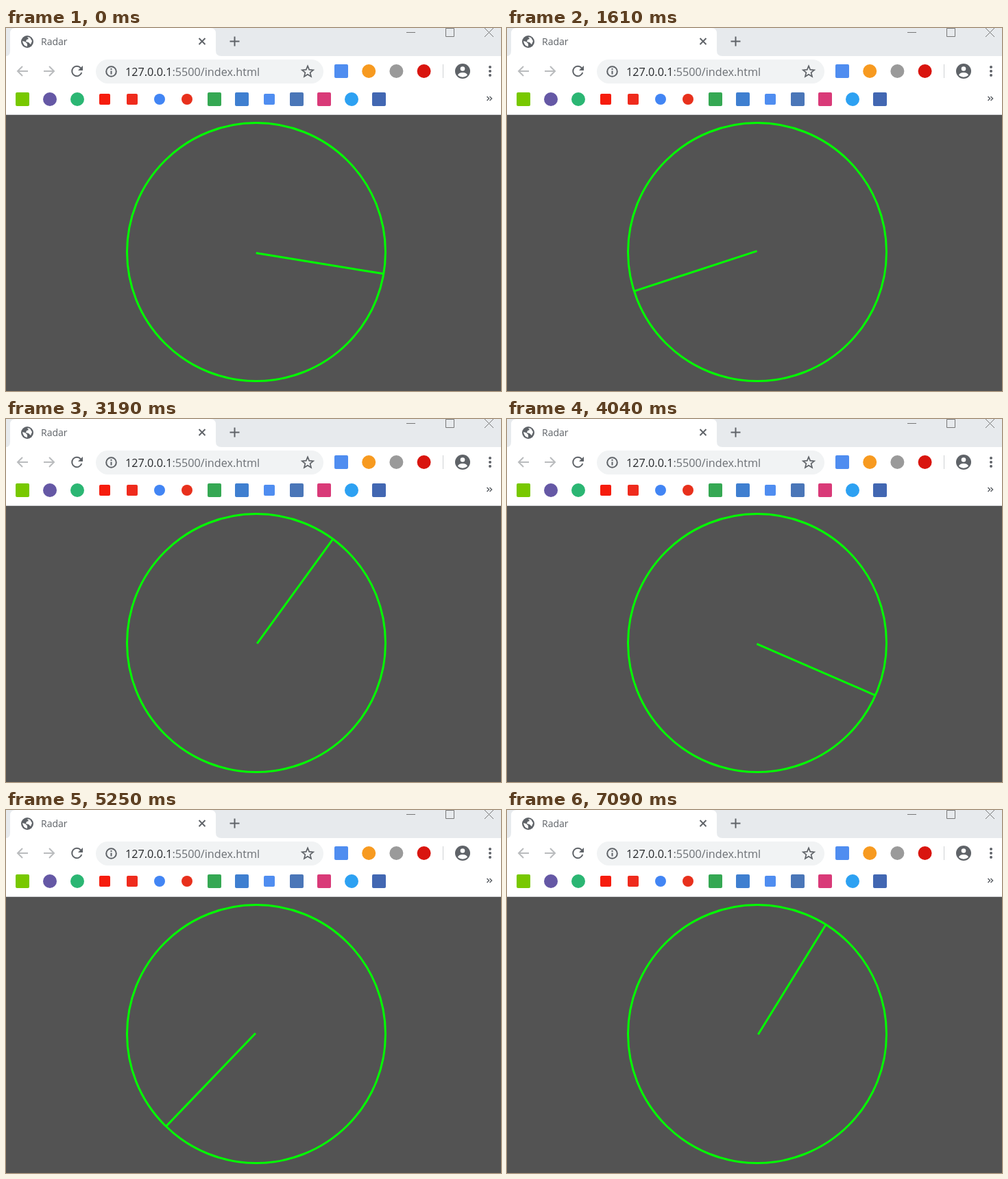
Animation of 722x530 px, one loop 7120 ms. Source, as an HTML page:

```html
<!DOCTYPE html>
<html lang="en">
<head>
<meta charset="utf-8">
<title>Radar</title>
<style>
  html, body { margin: 0; width: 100%; height: 100%; overflow: hidden; background: #535353; }
  svg { display: block; }
  text { font-family: "Open Sans", "Noto Sans", sans-serif; }
  .line { fill: none; stroke: #5f6368; stroke-width: 2; }
</style>
</head>
<body>
<svg width="722" height="530" viewBox="0 0 722 530">
  <rect width="722" height="530" fill="#535353"/>

  <!-- Tab strip and toolbar -->
  <rect width="722" height="41" fill="#e7eaed"/>
  <path d="M0 41Q6 41 6 33V8Q6 0 14 0H298Q306 0 306 8V33Q306 41 314 41H722V126H0Z" fill="#fff"/>
  <rect y="126" width="722" height="1" fill="#d4d6d8"/>
  <circle cx="31" cy="20" r="9" fill="#5f6368"/>
  <path d="M24 19l4 1 3 3v4q-6-1-7-8zM31 13l4 1 3 5-2 5-3-3-4-1 1-3 3-1z" fill="#fff"/>
  <text x="51" y="25" font-size="14" fill="#5f6368">Radar</text>
  <path class="line" d="M281.500 15l9 9m0-9l-9 9M326.500 19.500h14m-7-7v14"/>
  <path class="line" d="M584 6.500h13M641.500 0.500h12v12h-12zM698 0l13 13m0-13l-13 13" style="stroke:#777;stroke-width:1"/>

  <!-- Navigation -->
  <path class="line" d="M32 63H17m7-7l-7 7 7 7M55 63h15m-7-7l7 7-7 7" style="stroke:#babcbe"/>
  <path class="line" d="M109 58.500A7.200 7.200 0 1 0 110.300 65"/>
  <path d="M112 55v7h-7z" fill="#5f6368"/>
  <rect x="131" y="46" width="332" height="35" rx="17.500" fill="#f1f3f4"/>
  <circle class="line" cx="153.500" cy="63.500" r="7.300"/>
  <path class="line" d="M153.500 59v2m0 1.500v5"/>
  <text x="174" y="69.500" font-size="16.200" fill="#6b6f74"><tspan fill="#26282b">127.0.0.1</tspan>:5500/index.html</text>
  <path id="star" class="line" style="stroke-width:1.700"/>
  <path d="M637.500 53v20" stroke="#cfd1d4"/>
  <circle cx="666" cy="63" r="11" fill="#5f6368"/>
  <circle cx="666" cy="59.500" r="3.300" fill="#fff"/>
  <path d="M659 69q1-4 7-4t7 4q-7 5.500-14 0z" fill="#fff"/>
  <g fill="#5f6368"><circle cx="706" cy="57" r="2"/><circle cx="706" cy="63" r="2"/><circle cx="706" cy="69" r="2"/></g>
  <path class="line" d="M701.500 100l3 3-3 3m4-6l3 3-3 3" style="stroke-width:1.500"/>
  <g id="icons"></g>

  <!-- Radar -->
  <circle cx="365" cy="327" r="188.500" fill="none" stroke="#0f0" stroke-width="3"/>
  <g id="dots" fill="#0f0"></g>
  <rect id="beam" width="188" height="3" fill="#0f0"/>
</svg>
<script>
const LOOP = 7120, CX = 365, CY = 327;
const $ = id => document.getElementById(id);

function add(parent, tag, attrs) {
  const el = document.createElementNS("http://www.w3.org/2000/svg", tag);
  for (const key in attrs) el.setAttribute(key, attrs[key]);
  return $(parent).appendChild(el);
}

function icon(shape, x, y, size, fill) {
  const r = size / 2;
  if (shape === "o") add("icons", "circle", { cx: x, cy: y, r, fill });
  else add("icons", "rect", { x: x - r, y: y - r, width: size, height: size, rx: 2, fill });
}

// Extensions, then bookmarks: o = circle, s = square
[["s", "#4f8df0"], ["o", "#f79a20"], ["o", "#9a9a9a"], ["o", "#d9150f"]]
  .forEach(([shape, fill], i) => icon(shape, 489 + 40.2 * i, 63, 20, fill));
[["s", "#78c800"], ["o", "#6558a5"], ["o", "#2bb673"], ["s", "#f61c0d"], ["s", "#ef2b1d"],
 ["o", "#4285f4"], ["o", "#e8301c"], ["s", "#35a853"], ["s", "#3f7fd0"], ["s", "#4f8df0"],
 ["s", "#4a76b8"], ["s", "#d93a78"], ["o", "#2da1f2"], ["s", "#4267b2"]]
  .forEach(([shape, fill], i) => icon(shape, 24 + 40 * i, 104, [3, 4, 5, 6, 9].includes(i) ? 16 : 20, fill));

const points = Array.from({ length: 10 }, (_, i) => {
  const a = -Math.PI / 2 + i * Math.PI / 5, r = i % 2 ? 3.8 : 8.6;
  return [440 + r * Math.cos(a), 64 + r * Math.sin(a)];
});
$("star").setAttribute("d", "M" + points.join("L") + "Z");

// Blips, each with the beam angle that lights it
const blips = [[434, 396], [396, 433.5], [309, 296]].map(([x, y]) => ({
  el: add("dots", "circle", { cx: x, cy: y, r: 6.3 }),
  angle: (Math.atan2(y - CY, x - CX) * 180 / Math.PI + 360) % 360
}));

// The sweep starts slightly faster, then stays steady
const angleAt = t => t < 890 ? 9.2 + t * 0.0976 : 96.1 + (t - 890) * 0.0912;
const timeAt = a => a < 96.1 ? (a - 9.2) / 0.0976 : 890 + (a - 96.1) / 0.0912;

function glow(age) {
  return Math.max(0, age < 187 ? age / 187 : 1 - (age - 187) / 433);
}

function draw(t) {
  $("beam").setAttribute("transform", `translate(${CX} ${CY}) rotate(${angleAt(t)})`);
  for (const { el, angle } of blips) {
    const light = Math.max(glow(t - timeAt(angle)), glow(t - timeAt(angle + 360)));
    el.setAttribute("opacity", light);
  }
}

const begin = performance.now();
function tick() {
  draw((performance.now() - begin) % LOOP);
  requestAnimationFrame(tick);
}
tick();
</script>
</body>
</html>
```
